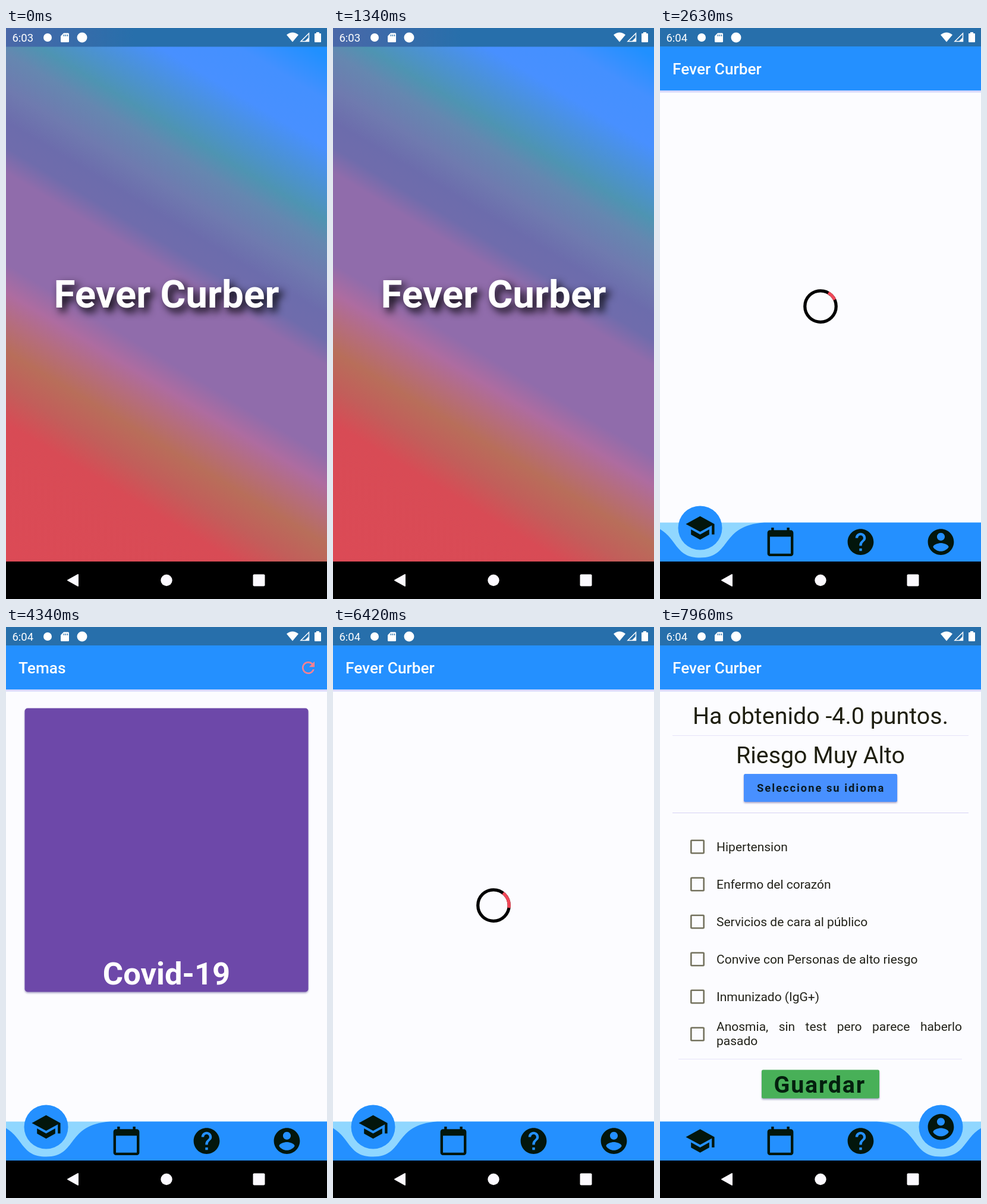
Animation, 540 px wide and 960 px high, one loop 8000 ms. Source, as an HTML page:

```html
<!DOCTYPE html>
<html lang="es">
<head>
<meta charset="utf-8">
<title>App</title>
<style>
html, body { margin: 0; width: 100%; height: 100%; overflow: hidden; background: #000; }
svg { display: block; width: 100vw; height: 100vh; }
text, p { font-family: Roboto, sans-serif; }
p { margin: 0; font-size: 21px; line-height: 24.6px; text-align: justify; color: #22221a; }
.mid { text-anchor: middle; }
.hero { font-size: 65.6px; font-weight: 700; fill: #fff; text-shadow: 6.5px 6.5px 14px #000; }
.bar { font-size: 26.25px; font-weight: 500; fill: #fff; }
.card { font-size: 52.5px; font-weight: 700; fill: #fff; }
.big { font-size: 39.4px; fill: #1f1f10; }
.row { font-size: 21px; fill: #22221a; }
.raised { filter: drop-shadow(0 2px 1.5px rgba(70, 60, 130, .45)); }
</style>
</head>
<body>
<svg viewBox="0 0 540 960">
  <defs>
    <linearGradient id="sky" gradientUnits="userSpaceOnUse" x1="540" y1="0" x2="0" y2="897">
      <stop offset=".04" stop-color="#2090ff"/><stop offset=".1" stop-color="#4490ff"/>
      <stop offset=".165" stop-color="#4890ff"/><stop offset=".22" stop-color="#4b92d4"/>
      <stop offset=".265" stop-color="#4e94b2"/><stop offset=".3" stop-color="#6587b0"/>
      <stop offset=".35" stop-color="#6f7aaf"/><stop offset=".395" stop-color="#6c6cac"/>
      <stop offset=".43" stop-color="#6f6cac"/><stop offset=".465" stop-color="#906cab"/>
      <stop offset=".59" stop-color="#906cab"/><stop offset=".63" stop-color="#ae6ca0"/>
      <stop offset=".67" stop-color="#b56d7c"/><stop offset=".71" stop-color="#b86e5a"/>
      <stop offset=".76" stop-color="#c25e5a"/><stop offset=".81" stop-color="#d84b55"/>
      <stop offset="1" stop-color="#dc4a56"/>
    </linearGradient>
    <linearGradient id="skyStatus">
      <stop stop-color="#4a68a8"/><stop offset=".4" stop-color="#276fab"/>
    </linearGradient>
    <clipPath id="list"><rect x="21" y="109" width="498" height="701"/></clipPath>
  </defs>

  <g id="splash">
    <rect width="540" height="897" fill="url(#sky)"/>
    <rect width="540" height="31.5" fill="url(#skyStatus)"/>
    <text class="hero mid" x="270" y="470">Fever Curber</text>
  </g>

  <g id="app">
    <rect width="540" height="897" fill="#fcfcff"/>
    <rect width="540" height="31" fill="#276fab"/>
    <rect y="105" width="540" height="3.5" fill="#d9d9fb"/>
    <rect y="31" width="540" height="74" fill="#2490ff"/>
    <text class="bar" id="title" x="21" y="78"></text>

    <g id="loading" fill="none" stroke-width="5.25">
      <circle cx="270" cy="468" r="26.25" stroke="#000"/>
      <path id="arc" stroke="#f04858"/>
    </g>

    <g id="topics">
      <g id="refresh" fill="#ff8090"></g>
      <rect class="raised" x="31.5" y="136.5" width="477" height="477" rx="5" fill="#6d48a9"/>
      <text class="card mid" x="270" y="601">Covid-19</text>
    </g>

    <g id="profile">
      <text class="big mid" x="270" y="163">Ha obtenido -4.0 puntos.</text>
      <text class="big mid" x="270" y="229">Riesgo Muy Alto</text>
      <path d="M21 182.5H519M31 726.5H508" stroke="#e6e3f8"/>
      <path d="M21 312.5H519" stroke="#d6d2f4"/>
      <rect class="raised" x="141" y="247" width="258" height="47" rx="2.5" fill="#4890ff"/>
      <text x="163" y="277" font-size="18.4" font-weight="700" letter-spacing="1.96" fill="#0b1a24">Seleccione su idioma</text>
      <g id="rows"></g>
      <foreignObject x="95" y="659.5" width="413" height="52"><p>Anosmia, sin test pero parece haberlo pasado</p></foreignObject>
      <rect class="raised" x="171" y="744.5" width="198" height="48" rx="2.5" fill="#48b058"/>
      <text x="191.5" y="783" font-size="39.4" font-weight="700" letter-spacing="1.8" fill="#04200e">Guardar</text>
      <g clip-path="url(#list)"><ellipse id="glow" cx="270" rx="747" fill="#2490ff"/></g>
    </g>

    <rect y="831.5" width="540" height="65.5" fill="#90d7ff"/>
    <g id="bubble"><circle r="37" fill="#2490ff"/><path id="bubbleIcon" fill="#03160c" transform="scale(2.1875) translate(-12 -12)"/></g>
    <path id="navBar" fill="#2490ff"/>
    <g id="navIcons" fill="#03160c"></g>
  </g>

  <g fill="#fff">
    <text id="clock" x="10.5" y="22.5" font-size="18.4"></text>
    <circle cx="70" cy="16" r="7"/>
    <path d="M97 8.5h7.5q1.5 0 1.5 1.5v12.5q0 1.5-1.5 1.5h-11q-1.5 0-1.5-1.5V13.5z"/>
    <path d="M97.5 11v3M100.5 11v3M103.5 11v3" stroke="#276fab" stroke-width="1.3"/>
    <circle cx="128" cy="16" r="8.5"/>
    <path d="M472 11.5Q482 3.5 492 11.5L482 23.5z"/>
    <path d="M509.5 9V22.5H496z" fill="none" stroke="#fff" stroke-width="1.5"/>
    <path d="M510 15V23H502z"/>
    <path d="M522 7h5v2h2q1 0 1 1v13q0 1-1 1h-9q-1 0-1-1V10q0-1 1-1h2z"/>
  </g>

  <rect y="897" width="540" height="63"/>
  <g fill="#fcfaff">
    <path d="M104 928.5L121 919V938z" stroke="#fcfaff" stroke-width="2" stroke-linejoin="round"/>
    <circle cx="270" cy="928.5" r="9.7"/>
    <rect x="415.5" y="918.5" width="20" height="20" rx="2"/>
  </g>
</svg>

<script>
const $ = id => document.getElementById(id);
const LOOP = 8000;
const HOME = 2170, TOPICS = 4250, RELOAD = 6257, PROFILE = 6640;
const disc = 'M12 2C6.48 2 2 6.48 2 12s4.48 10 10 10 10-4.48 10-10S17.52 2 12 2z';
const icons = [
  'M5 13.18v4L12 21l7-3.82v-4L12 17l-7-3.82zM12 3L1 9l11 6 9-4.91V17h2V9L12 3z',
  'M20 3h-1V1h-2v2H7V1H5v2H4c-1.1 0-2 .9-2 2v16c0 1.1.9 2 2 2h16c1.1 0 2-.9 2-2V5c0-1.1-.9-2-2-2zm0 18H4V8h16v13z',
  disc + 'm1 17h-2v-2h2v2zm2.07-7.75l-.9.92C13.45 12.9 13 13.5 13 15h-2v-.5c0-1.1.45-2.1 1.17-2.83l1.24-1.26c.37-.36.59-.86.59-1.41 0-1.1-.9-2-2-2s-2 .9-2 2H8c0-2.21 1.79-4 4-4s4 1.79 4 4c0 .88-.36 1.68-.93 2.25z',
  disc + 'm0 3c1.66 0 3 1.34 3 3s-1.34 3-3 3-3-1.34-3-3 1.34-3 3-3zm0 14.2c-2.5 0-4.71-1.28-6-3.22.03-1.99 4-3.08 6-3.08 1.99 0 5.97 1.09 6 3.08-1.29 1.94-3.5 3.22-6 3.22z'
];
const refresh = 'M17.65 6.35C16.2 4.9 14.21 4 12 4c-4.42 0-7.99 3.58-7.99 8s3.57 8 7.99 8c3.73 0 6.84-2.55 7.73-6h-2.08c-.82 2.33-3.04 4-5.65 4-3.31 0-6-2.69-6-6s2.69-6 6-6c1.66 0 3.14.69 4.22 1.78L13 11h7V4l-2.35 2.35z';
const options = ['Hipertension', 'Enfermo del corazón', 'Servicios de cara al público',
  'Convive con Personas de alto riesgo', 'Inmunizado (IgG+)', ''];

const iconPath = (d, scale) => `<path d="${d}" transform="scale(${scale}) translate(-12 -12)"/>`;
$('refresh').innerHTML = iconPath(refresh, 1.3125);
$('refresh').setAttribute('transform', 'translate(508.5 68.5)');
$('navIcons').innerHTML = icons.map(d => `<g>${iconPath(d, 2.1875)}</g>`).join('');
$('rows').innerHTML = options.map((label, i) => {
  const y = 369.5 + 63 * i;
  return `<rect x="52.3" y="${y - 10.7}" width="21.4" height="21.4" rx="1" fill="none" stroke="#75735f" stroke-width="2.6"/>
    <text class="row" x="95" y="${y + 7}">${label}</text>`;
}).join('');

const clamp = x => Math.min(1, Math.max(0, x));
const easeOut = k => 1 - (1 - clamp(k)) ** 2;
const show = (id, on) => $(id).style.display = on ? '' : 'none';
const set = (el, attrs) => { for (const k in attrs) el.setAttribute(k, attrs[k]); };

// cubic-bezier(.4, 0, .2, 1)
function fastOutSlowIn(x) {
  if (x <= 0 || x >= 1) return clamp(x);
  let lo = 0, hi = 1, s;
  for (let i = 0; i < 20; i++) {
    s = (lo + hi) / 2;
    const bx = 1.2 * s * (1 - s) ** 2 + .6 * s * s * (1 - s) + s ** 3;
    if (bx < x) lo = s; else hi = s;
  }
  return 3 * s * s - 2 * s ** 3;
}

function drawSpinner(ms) {
  const phase = ms / 1333 % 1;
  const head = fastOutSlowIn(phase * 2), tail = fastOutSlowIn(phase * 2 - 1);
  const start = Math.PI * (-.5 + 1.5 * tail + 2 * (ms / 2222 % 1) + .5 * phase);
  const sweep = Math.max(1.5 * Math.PI * (head - tail), .001);
  const point = a => `${270 + 26.25 * Math.cos(a)} ${468 + 26.25 * Math.sin(a)}`;
  set($('arc'), { d: `M${point(start)}A26.25 26.25 0 ${+(sweep > Math.PI)} 1 ${point(start + sweep)}` });
}

function drawNav(pos) {
  const x = 67.5 + 135 * pos, top = 831.5, low = top + 59, shoulder = top + 4.9;
  const sink = 105 * (1 - Math.abs(1.5 - pos) / 1.5);
  set($('bubble'), { transform: `translate(${x} ${840.5 + sink})` });
  set($('bubbleIcon'), { d: icons[pos < 1.5 ? 0 : 3] });
  set($('navBar'), { d: `M-60 ${top}H${x - 108}C${x - 32.4} ${shoulder} ${x - 54} ${low} ${x} ${low}
    C${x + 54} ${low} ${x + 32.4} ${shoulder} ${x + 108} ${top}H600V897H-60z` });
  [...$('navIcons').children].forEach((icon, i) => {
    const away = clamp(Math.abs(i - pos));
    set(icon, { opacity: away, transform: `translate(${67.5 + 135 * i} ${864 + 52.5 * (1 - away)})` });
  });
}

function drawGlow(t) {
  const level = t < 6960 ? easeOut((t - 6800) / 160) : 1 - easeOut((t - 6960) / 600);
  const size = .92 * level;
  set($('glow'), { cy: 810 + 647 * size, ry: 747 * size, opacity: .34 * level });
}

function draw(t) {
  const topics = t >= TOPICS && t < RELOAD, profile = t >= PROFILE;
  show('splash', t < HOME);
  show('app', t >= HOME);
  show('topics', topics);
  show('profile', profile);
  show('loading', !topics && !profile);
  $('title').textContent = topics ? 'Temas' : 'Fever Curber';
  $('clock').textContent = t < 1450 ? '6:03' : '6:04';
  drawSpinner(Math.max(0, t - (t < TOPICS ? 2500 : RELOAD)));
  drawNav(3 * easeOut((t - 6440) / 400));
  drawGlow(t);
}

const began = performance.now();
function tick() {
  draw((performance.now() - began) % LOOP);
  requestAnimationFrame(tick);
}
tick();
</script>
</body>
</html>
```
